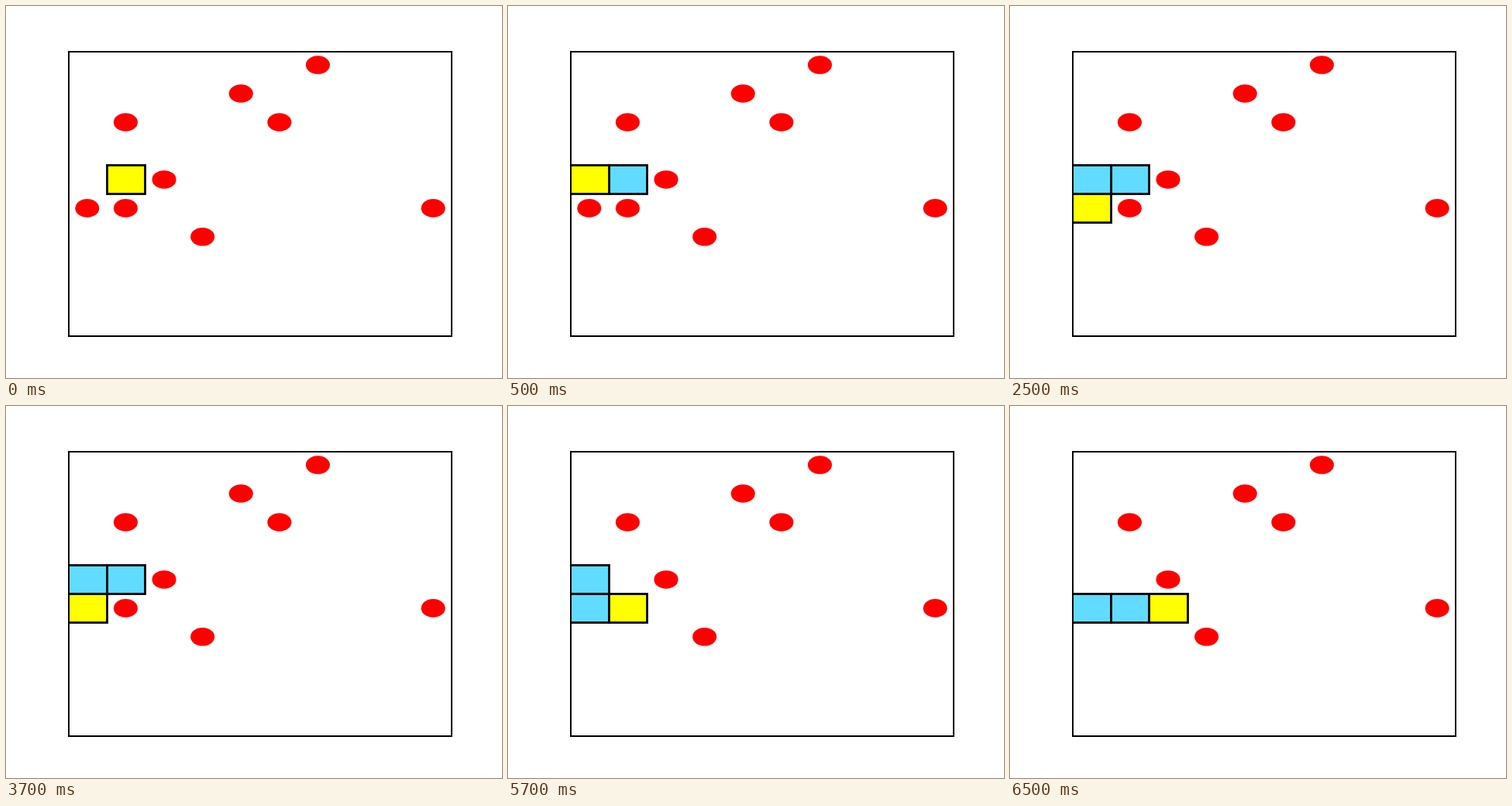
An HTML page that plays this animation: 640 px wide and 480 px high, repeating every 8 s.

```html
<!DOCTYPE html>
<html lang="en">
<head>
<meta charset="utf-8">
<title>Snake on a grid</title>
<style>
  html, body { margin: 0; width: 100%; height: 100%; overflow: hidden; background: #fff; }
  svg { display: block; width: 640px; height: 480px; }
  .cell { stroke: #000; stroke-width: 2.78; }
  .head { fill: #ff0; }
  .body { fill: #61dbff; }
  .food { fill: #f00; }
  .frame { fill: none; stroke: #000; stroke-width: 2; }
</style>
</head>
<body>
<svg viewBox="0 0 640 480">
  <clipPath id="board"><rect x="80" y="58" width="496" height="369"/></clipPath>
  <g id="scene" clip-path="url(#board)"></g>
  <rect class="frame" x="81" y="59" width="494" height="367"/>
</svg>
<script>
const LOOP = 8000;
const LEFT = 80, TOP = 57.6, CELL_W = 49.6, CELL_H = 36.96;

// Head positions [column, row] and the time each one is reached
const path = [[1, 4], [0, 4], [0, 5], [1, 5], [2, 5]];
const times = [0, 500, 2500, 4500, 6500];
const maxLength = 3;
const foods = [[6, 0], [4, 1], [1, 2], [5, 2], [2, 4], [0, 5], [1, 5], [9, 5], [3, 6]];

const scene = document.getElementById('scene');
const snap = v => Math.round(v) + 0.5;
const edgeX = col => snap(LEFT + col * CELL_W);
const edgeY = row => snap(TOP + row * CELL_H);

function add(tag, attrs) {
  const el = document.createElementNS('http://www.w3.org/2000/svg', tag);
  for (const key in attrs) el.setAttribute(key, attrs[key]);
  scene.appendChild(el);
}

function drawCell([col, row], kind) {
  const x = edgeX(col), y = edgeY(row);
  add('rect', {
    class: 'cell ' + kind, x, y,
    width: edgeX(col + 1) - x, height: edgeY(row + 1) - y
  });
}

function drawFood([col, row]) {
  add('ellipse', {
    class: 'food',
    cx: LEFT + (col + 0.5) * CELL_W, cy: TOP + (row + 0.5) * CELL_H,
    rx: 15.57, ry: 11.78
  });
}

function draw(step) {
  scene.replaceChildren();
  const visited = path.slice(0, step + 1);
  const eaten = ([c, r]) => visited.some(p => p[0] === c && p[1] === r);
  foods.filter(f => !eaten(f)).forEach(drawFood);
  const snake = visited.slice(-maxLength);
  snake.forEach((p, i) => drawCell(p, i === snake.length - 1 ? 'head' : 'body'));
}

let shown = -1;
const start = performance.now();

function tick(now) {
  const t = Math.max(0, now - start) % LOOP;
  const step = times.filter(at => at <= t).length - 1;
  if (step !== shown) draw(shown = step);
  requestAnimationFrame(tick);
}
tick(start);
</script>
</body>
</html>
```
